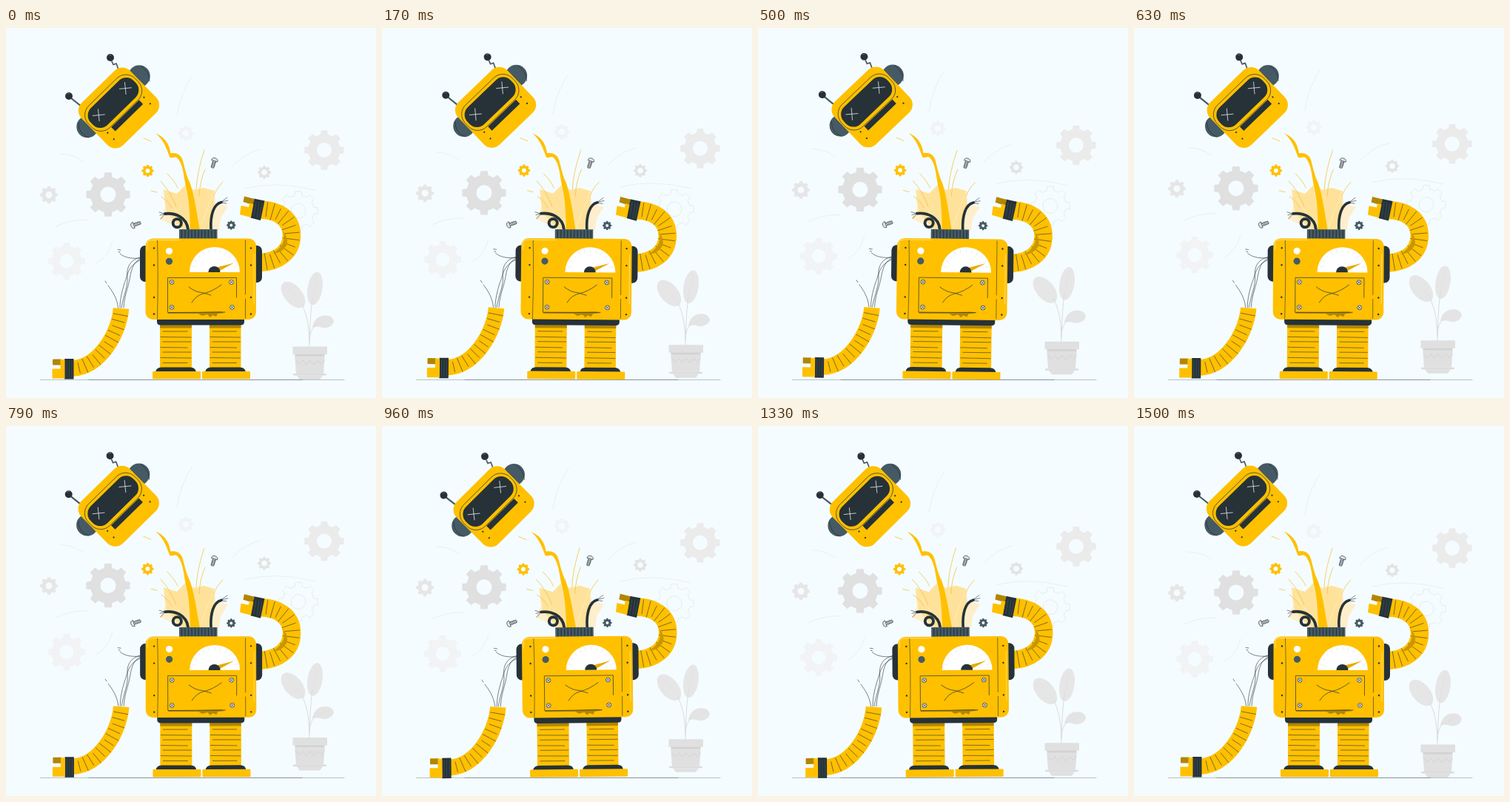
Recreate the animation shown at these times as an HTML page. Size 500 by 500 pixels, loop 1.54 s.

```html
<!DOCTYPE html>
<html lang="en">
<head>
<meta charset="utf-8">
<title>Broken robot</title>
<style>
html, body { margin: 0; width: 100%; height: 100%; overflow: hidden; background: #f4fcff; }
svg { display: block; width: 100vw; height: 100vh; }
</style>
</head>
<body>
<svg id="stage" viewBox="0 0 500 500" fill="none"></svg>
<script>
const YELLOW = '#ffc000', DARK = '#263238', SLATE = '#455a64', OCHRE = '#b28600';

const fill = (d, color) => `<path d="${d}" fill="${color}" fill-rule="evenodd"/>`;
const line = (d, color = DARK, w = 0.7, cap = 'round') =>
  `<path d="${d}" stroke="${color}" stroke-width="${w}" stroke-linecap="${cap}" stroke-linejoin="round"/>`;
const dot = (x, y, r, color) => `<circle cx="${x}" cy="${y}" r="${r}" fill="${color}"/>`;
const box = (x, y, w, h, r, color, extra = '') =>
  `<rect x="${x}" y="${y}" width="${w}" height="${h}" rx="${r}" fill="${color}" ${extra}/>`;
const leaf = (x, y, rx, ry, turn) =>
  `<ellipse cx="${x}" cy="${y}" rx="${rx}" ry="${ry}" transform="rotate(${turn} ${x} ${y})" fill="#e6e6e6"/>`;
const group = (transform, body) => `<g transform="${transform}">${body}</g>`;

function gearPath(x, y, r, hole) {
  const teeth = 8, pts = [];
  for (let i = 0; i < teeth; i++) {
    for (const [offset, k] of [[-0.29, 0.81], [-0.2, 1], [0.2, 1], [0.29, 0.81]]) {
      const a = (i + offset) * 2 * Math.PI / teeth;
      pts.push((x + r * k * Math.sin(a)).toFixed(2) + ' ' + (y - r * k * Math.cos(a)).toFixed(2));
    }
  }
  return `M${pts.join('L')}ZM${x - hole} ${y}a${hole} ${hole} 0 1 0 ${2 * hole} 0a${hole} ${hole} 0 1 0 ${-2 * hole} 0Z`;
}
const gear = (x, y, r, hole, color) => fill(gearPath(x, y, r, hole), color);

// Ribbed hose that follows a curve
function hose(d, width, ribs) {
  const path = document.createElementNS('http://www.w3.org/2000/svg', 'path');
  path.setAttribute('d', d);
  const len = path.getTotalLength();
  let marks = '';
  for (let i = 1; i < ribs; i++) {
    const s = len * i / ribs;
    const p = path.getPointAtLength(s), q = path.getPointAtLength(s + 0.5);
    const a = Math.atan2(q.y - p.y, q.x - p.x);
    const nx = -Math.sin(a) * width / 2, ny = Math.cos(a) * width / 2;
    const from = i % 2 ? -0.95 : -0.7, to = i % 3 ? 0.85 : 0.6;
    marks += `M${p.x + nx * from} ${p.y + ny * from}L${p.x + nx * to} ${p.y + ny * to}`;
  }
  return line(d, YELLOW, width, 'butt') + line(marks, DARK, 0.6);
}

function backdrop() {
  const arcs = 'M231 119Q236 87 252 64M73 170Q90 170 104 180M68 268Q85 259 111 259' +
    'M305 188Q322 169 344 164M322 217Q365 206 417 219M122 318Q138 310 144 288';
  return line(arcs, '#e6ecee', 0.8) +
    gear(138, 225, 30, 10.5, '#e0e0e0') +
    gear(430, 165, 27, 10, '#ebebeb') +
    gear(58, 225.5, 12, 4.5, '#e6e6e6') +
    gear(349, 195, 9, 3.8, '#e3e3e3') +
    gear(243, 142.5, 10.5, 4.5, '#f1f3f4') +
    gear(82, 315, 25, 9.5, '#f1f3f4') +
    line(gearPath(395, 247, 26.5, 10), '#e4e7e8', 0.8) +
    plant();
}

function plant() {
  return leaf(388, 360.5, 12, 21, -40) + leaf(417.5, 352, 10, 22.5, 9) +
    fill('M414 405C416 392 424 388 433 388.5C440 389 443 394 443 397C440 405 432 406 427 405C421 403 418 404 414 405Z', '#e4e4e4') +
    line('M410 431C410 408 408 390 400 374M410 423C411 402 411 390 414 366M410 425C410 415 412 408 417 403', '#dcdcdc', 1) +
    line('M403 376L379 347M413 371L420 336M416 403L438 393', '#dfdfdf', 0.6) +
    fill('M390 440H431L429 467H392Z', '#e0e0e0') +
    box(387.5, 430.5, 46.5, 10.5, 0.5, '#e0e0e0') +
    fill('M391 441H430L429.8 443.5H391.2Z', '#d2d2d2') +
    line('M392 449L396 454L401 449L406 455L411 449L416 455L421 449L426 454L430 449', '#d0d0d0', 0.8) +
    box(388, 467, 45, 2.5, 1, '#dcdcdc') +
    fill('M393 469.5H428L424 475H397Z', '#e0e0e0');
}

function head() {
  const studs = [-1, 1].map(s => dot(s * 34.3, 13.5, 1.1, DARK) + dot(s * 34.3, 25.5, 1.1, DARK)).join('');
  const shell = box(-46, -40, 92, 80, 15, YELLOW) +
    box(-44.5, -30.5, 88, 41, 17.5, 'none', `stroke="${DARK}" stroke-width=".7"`) +
    box(-41, -26.3, 81, 32, 14, DARK) +
    box(-25.5, 11.4, 52.5, 7.8, 0.3, DARK) + studs;
  const spark = (x, y) => line(`M${x - 8} ${y + 0.8}L${x + 8} ${y - 0.8}M${x - 0.8} ${y - 8}L${x + 0.8} ${y + 8}`, '#e8eef0', 0.8);
  return line('M87 94L102 106', SLATE, 2.2) + line('M143 45L145 49.5L149 48L152 56', SLATE, 1.7) +
    dot(85, 92, 5, DARK) + dot(141, 40, 5, DARK) +
    line('M83 89L86 88M139 37L142 36.5', '#78909c', 0.6) +
    dot(180, 65, 14.7, SLATE) + dot(110, 133.5, 14.7, SLATE) +
    line('M183 52C190 57 194 64 194 72M98 128C98 138 103 145 112 148', DARK, 0.7) +
    group('translate(152.5 108) rotate(-44.3)', shell) +
    spark(125.3, 117.7) + spark(161.3, 81.5);
}

function screw(x, y, turn) {
  return group(`translate(${x} ${y}) rotate(${turn}) scale(.92)`,
    box(-2, -4, 4, 12, 0.8, '#dfe5e8', `stroke="${DARK}" stroke-width=".6"`) +
    line('M-2.4 0L2.4 -1M-2.4 2.3L2.4 1.3M-2.4 4.6L2.4 3.6M-2 6.9L2 5.9', DARK, 0.7) +
    fill('M-4.6 -3Q-4.6 -7 0 -7Q4.6 -7 4.6 -3Z', '#e0e6e9') +
    line('M-4.6 -3Q-4.6 -7 0 -7Q4.6 -7 4.6 -3Z', DARK, 0.7));
}

function blast() {
  return fill('M237 272L208 258L215 244L213 218.5L231 224L243 211L254 219L267 216L282 220L283 237L300 241.5L290 257L288 273H237Z', '#ffeecb') +
    fill('M239 273L217 250L213 218.5L231 224L243 212L254 219L267 216L281 220L282 246L276 273Z', '#ffe29a') +
    line('M213 220L246 270M281 221L262 270M243 213L250 260', '#ffedc4', 0.8) +
    line('M186 149L196 153M196 220L204 222M209 207Q223 222 230 242M268 165Q258 195 257 218' +
      'M269 191Q262 207 261 227M293 208Q285 216 281 226M218 197Q228 207 232 216M210 228Q219 234 224 243', '#f3c44a', 0.8) +
    fill('M202.5 142.5C212 146.5 220.5 154 222.5 169.5C229 168 236 170.5 238.5 178C242 190 243.5 199 248.5 209C255 228 258 252 262 273H249C248.5 252 247.5 232 243 214C240 200 239.5 185 232 176C228 172.5 225 176.5 221.5 175C217.5 165 214 152 202.5 142.5Z', YELLOW) +
    line('M215 251C228 249.5 244 255 246 272', DARK, 3.8) +
    `<circle cx="231.3" cy="263.7" r="5.6" stroke="${DARK}" stroke-width="3.9"/>` +
    line('M215 251L208 253M215 251L209 258M214 251L207 249', DARK, 0.6) +
    line('M277 272C276 254 280 238 291 235.5', DARK, 3.6) +
    line('M291 235L299 229M291 235L300 233M291 236L298 237', DARK, 0.6) +
    gear(191.5, 193, 8.2, 3, YELLOW) + gear(304.3, 266.5, 6.2, 2, SLATE) +
    screw(281, 182, 17) + screw(175, 265.5, -110);
}

function leg(x, w, footX) {
  let ribs = '';
  [410, 417.5, 424, 431.5, 438, 445.5, 452.5].forEach((y, i) => {
    ribs += `M${x + (i % 2 ? 1 : 4)} ${y}L${x + w - (i % 3 ? 1 : 6)} ${y + (i % 2 ? 0.5 : 0)}`;
  });
  return box(x, 400, w, 60, 0, YELLOW) + box(x, 400, w, 5.5, 0, OCHRE) + line(ribs, DARK, 0.6) +
    fill(`M${footX + 4} 465Q${footX + 5} 458.5 ${footX + 12} 458.5H${footX + 51}Q${footX + 58} 458.5 ${footX + 59} 465Z`, DARK) +
    box(footX, 464, 65, 10.3, 1, YELLOW);
}

function gauge() {
  let ticks = '';
  for (let i = 1; i < 12; i++) {
    const a = Math.PI * i / 12, c = Math.cos(a), s = Math.sin(a);
    ticks += `M${282 + 27 * c} ${330 - 27 * s}L${282 + 32 * c} ${330 - 32 * s}`;
  }
  return fill('M248 330A34 34 0 0 1 316 330Z', '#fff') + line(ticks, '#dfe3e5', 0.6) +
    fill('M283 324L308 317.5L287 329Z', '#e5ac00') +
    fill('M273.5 330A8 8 0 0 1 289.5 330Z', DARK);
}

function torso() {
  let studs = '', bolts = '';
  for (const y of [297.5, 320.5, 364, 386.5]) studs += dot(200, y, 1.2, DARK) + dot(331, y, 1.2, DARK);
  for (const [x, y] of [[224, 343.5], [304.5, 343.5], [224, 377.5], [305.5, 377.5]]) {
    bolts += `<circle cx="${x}" cy="${y}" r="3" fill="#e0e0e0" stroke="${DARK}" stroke-width=".7"/>` +
      line(`M${x - 1.5} ${y - 1.5}l3 3m0 -3l-3 3`, DARK, 0.7);
  }
  return box(181, 294, 16, 49, 7, DARK) + box(329, 294, 17, 50, 7, DARK) +
    fill('M204 393H322V397Q322 401.5 317 401.5H209Q204 401.5 204 397Z', DARK) +
    box(234, 272, 51.5, 13, 0.5, SLATE) +
    line([...Array(11)].map((_, i) => `M${237.5 + i * 4.5} 273.5V284`).join(''), DARK, 1.2) +
    box(188.5, 284.5, 149.5, 109.5, 10, YELLOW) +
    line('M204.5 287Q206 330 204.5 393M323.5 287V360M323.5 366V392', DARK, 0.6) +
    line('M191 300V290Q192 287 197 286.5H234M335 305V372', '#ffe9a8', 0.7) + studs +
    dot(220.5, 301.5, 4.6, '#fff') + dot(220.5, 315.3, 4.6, SLATE) + gauge() +
    fill('M219 384L262 384L290 383L296 385L286 386L284 390L279 388L276 391L272 387L265 389L260 386L219 386Z', OCHRE) +
    line('M218.5 384V337.5H311.5V364M219 384.5L296 384', DARK, 0.7) +
    line('M247 350Q256 357 265 357.5L277 361M291 347Q279 356 268 358.5T251 371', DARK, 0.7) + bolts;
}

function arms() {
  return hose('M343 317C366 316 386 304 386 280C386 257 367 246 344 245.5', 24.5, 15) +
    fill('M374 274Q381 292 360 305Q372 305 379 294Q383 285 374 274Z', '#c99700') +
    fill('M335 230.5L349.5 233.5L344 260L330.5 256.5Z', DARK) +
    line('M338 235L335 254M342 236L339 256M346 237L342 256', SLATE, 0.6) +
    fill('M322 227.5L336 231L333.5 239L320.5 235Z', OCHRE) +
    fill('M317.5 240L328 242L329 236.5L334.5 238L331 256L316 252Z', YELLOW) +
    hose('M155.5 379C153 412 127 458 90 460', 21.5, 13) +
    box(79, 447, 12.5, 27.5, 0.5, DARK) +
    line('M82 450V472M85.5 450V472M89 450V472', SLATE, 0.6) +
    box(63, 447.5, 12, 8, 1, OCHRE) +
    fill('M73.5 448H79.5V473.5H62.5V460.5H73.5Z', YELLOW) +
    line('M181 310C165 314 163 327 164 336C165 350 159 360 156 378M181 312C170 318 169 330 167 340C164 355 160 361 159 378' +
      'M181 314C164 321 164 336 160 345C156 358 154 368 154 378M181 311C168 312 160 310 154 305' +
      'M151.5 378C150 364 143 355 138 348M151 299.5L155 300M152 302.5L154 303M134 342L136 345', DARK, 0.6);
}

const stage = document.getElementById('stage');
stage.innerHTML = `<g id="back">${backdrop()}</g>` +
  line('M46.5 475.4H457', '#8b969b', 0.6) + line('M112 475.4H400', '#5b686e', 0.5) +
  `<g id="robot">${blast() + head() + leg(208, 43, 198) + leg(275, 42.5, 265) + arms() + torso()}</g>`;
const back = document.getElementById('back'), robot = document.getElementById('robot');

const LOOP = 1540, CYCLE = 1500, STEPS = 36;

// Both motions run in 24 steps per second, with a short rest at the end
function draw(ms) {
  const step = Math.floor((ms % LOOP + 5) * STEPS / CYCLE);
  const p = Math.min(step, STEPS) / STEPS;
  const lift = -10 * (1 - Math.abs(1 - 2 * p));
  const sway = p < 0.25 ? 4 * p : p < 0.75 ? 2 - 4 * p : 4 * p - 4;
  back.setAttribute('transform', `translate(0 ${lift})`);
  robot.setAttribute('transform', `rotate(${sway} 250 250)`);
}

const start = performance.now();
function tick() {
  draw(performance.now() - start);
  requestAnimationFrame(tick);
}
tick();
</script>
</body>
</html>
```
